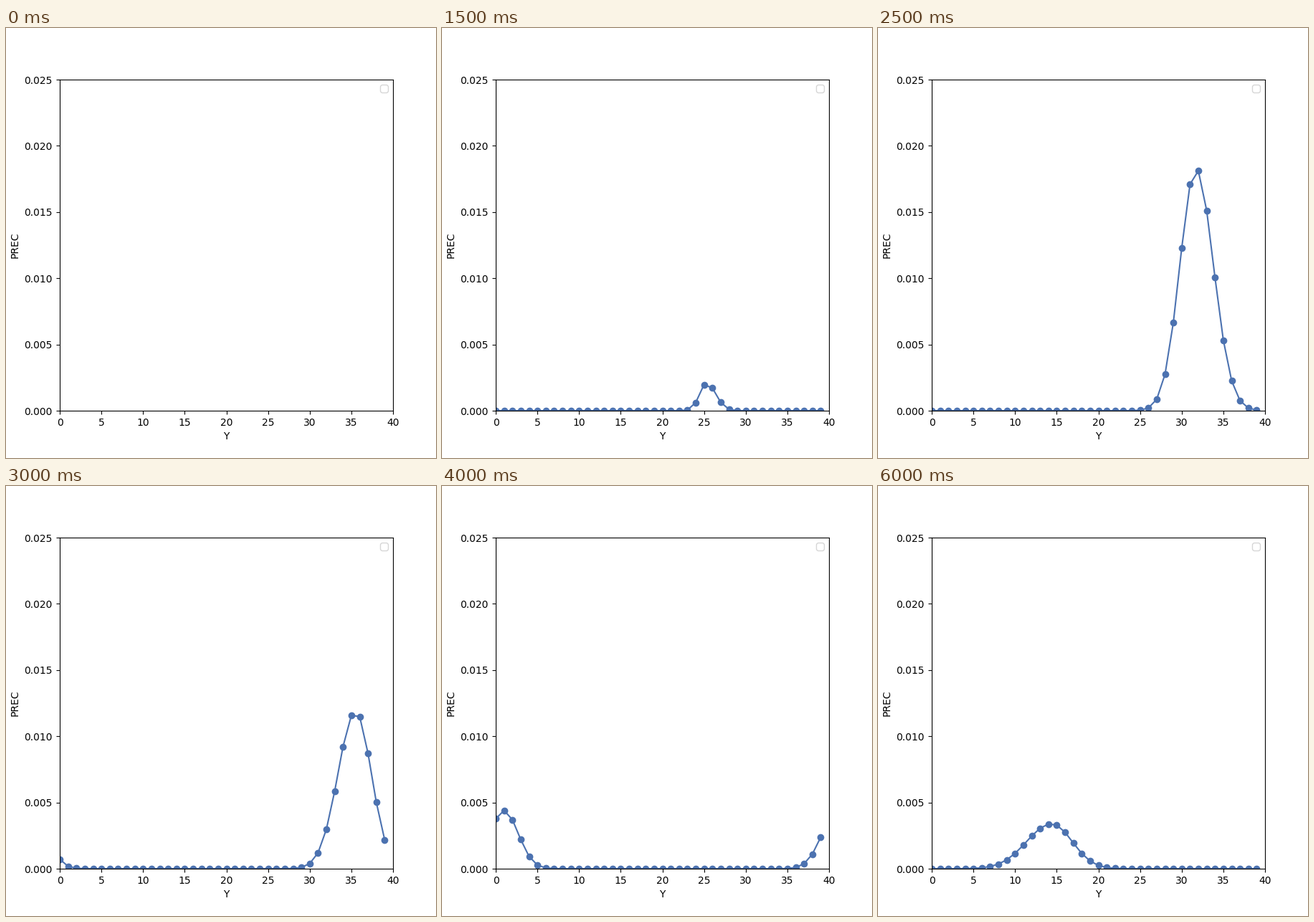
Recreate the animation shown at these times as a matplotlib script. Size 600 px wide and 600 px high, loop 6.5 s.

```python
import matplotlib.pyplot as plt
import numpy as np
from matplotlib.animation import FuncAnimation

CELLS = 40
STEPS = 13

# Key poses of the rain band, blended linearly over the steps.
# Centres past the last cell wrap around the periodic domain.
KEY_STEPS = [2, 3, 5, 6, 8, 10, 12]
CENTRE = [24, 25.3, 31.7, 35.5, 41, 47.6, 54.4]
HEIGHT = [0, 0.0021, 0.0183, 0.0119, 0.0044, 0.0024, 0.0034]
REAR = [0.8, 0.83, 1.9, 2.1, 1.8, 1.8, 3.0]
FRONT = [0.8, 1.1, 2.1, 1.9, 1.7, 2.1, 2.45]

cells = np.arange(CELLS)


def profile(step):
    """Gaussian band with its own spread behind and ahead of the peak."""
    centre, height, rear, front = (
        np.interp(step, KEY_STEPS, keys)
        for keys in (CENTRE, HEIGHT, REAR, FRONT))
    half = CELLS / 2
    offset = (cells - centre + half) % CELLS - half
    spread = np.where(offset < 0, rear, front)
    return height * np.exp(-0.5 * (offset / spread) ** 2)


fig, ax = plt.subplots(figsize=(6, 6), dpi=100)
ax.set(xlim=(0, CELLS), ylim=(0, 0.025), xlabel="Y", ylabel="PREC")
ax.tick_params(axis="y", pad=4.22)
ax.legend([], [], loc="upper right")
line, = ax.plot([], [], marker="o", color="#4C72B0")


def update(step):
    # The first step shows the empty axes.
    if step == 0:
        line.set_data([], [])
    else:
        line.set_data(cells, profile(step))
    return line,


anim = FuncAnimation(fig, update, frames=STEPS, interval=500,
                     repeat=True, repeat_delay=0)
plt.show()
```
